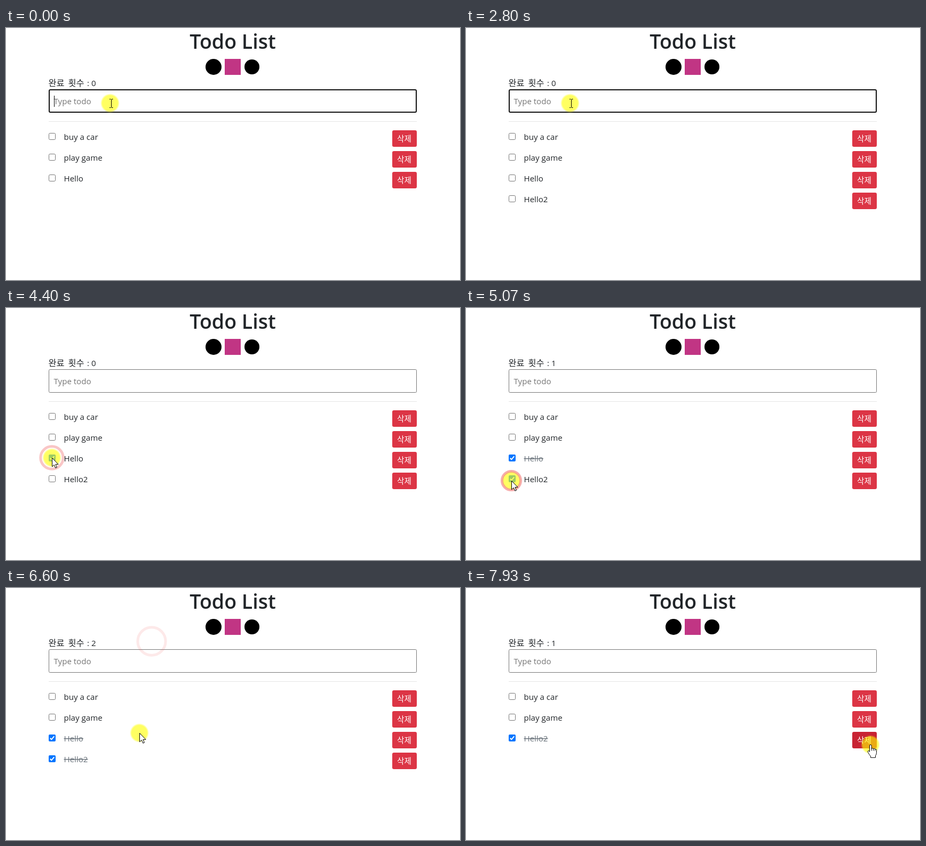
An HTML page that plays this animation: 851 px wide and 473 px high, repeating every 8 s.

```html
<!DOCTYPE html>
<html lang="ko">
<head>
<meta charset="utf-8">
<title>Todo List</title>
<style>
  html, body { margin: 0; width: 100%; height: 100%; overflow: hidden; background: #fff; }
  svg { display: block; width: 851px; height: 473px; }
  text { font: 15.1px "Open Sans", "Noto Sans", "Noto Sans CJK KR", sans-serif; fill: #212529; white-space: pre; }
  text.title { font-size: 37.5px; font-weight: 600; text-anchor: middle; }
  text.ko { font: 16.4px "Noto Sans CJK KR", sans-serif; }
  text.btn { font: 14.6px "Noto Sans CJK KR", sans-serif; fill: #fff; text-anchor: middle; }
  text.done { fill: #6c757d; text-decoration: line-through; }
  .selected text { fill: #fff; }
</style>
</head>
<body>
<svg viewBox="0 0 851 473">
  <defs>
    <radialGradient id="glow">
      <stop offset=".8" stop-color="#ff0" stop-opacity=".62"/>
      <stop offset="1" stop-color="#ff0" stop-opacity="0"/>
    </radialGradient>
    <clipPath id="selectionClip"><rect id="selectionArea" y="91" height="25"/></clipPath>
  </defs>

  <text class="title" x="425" y="39">Todo List</text>
  <circle cx="389" cy="73" r="15"/>
  <rect x="410" y="58" width="30" height="30" fill="#c13584"/>
  <circle cx="461" cy="73" r="14"/>

  <g id="counter">
    <text class="ko" x="79.5" y="109">완료</text>
    <text class="ko" x="116.5" y="109">횟수</text>
    <text id="count" x="152" y="109"></text>
  </g>
  <g id="selection" clip-path="url(#selectionClip)">
    <rect x="80" y="91" width="89" height="25" fill="#0078d7"/>
    <g class="selected" id="selectedText"></g>
  </g>

  <rect id="field" fill="#fff"/>
  <text id="fieldText" x="89.5" y="143"></text>
  <rect id="caret" y="127" width="1" height="21"/>
  <rect x="80" y="175" width="690" height="1" fill="#e5e5e5"/>
  <g id="list"></g>

  <circle id="halo" r="18" fill="url(#glow)"/>
  <circle id="ring" fill="none" stroke="#eb3c3c" stroke-width="5"/>
  <g id="pointer">
    <path id="arrow" fill="#fff" stroke="#000" d="M.5 .5V16.8L4.2 13.4 6.8 19.3 9.4 18.2 6.9 12.4H12z"/>
    <path id="ibeam" fill="none" stroke="#000" d="M-1 -7.5H1.5M3 -7.5H5.5M2.5 -7V8M-1 8.5H1.5M3 8.5H5.5"/>
    <path id="hand" fill="#fff" stroke="#000" stroke-linejoin="round"
      d="M-1.5 2q0-1.8 1.8-1.8t1.8 1.8v6q.2-1.3 1.7-1.3 1.6 0 1.7 1.7 .3-1 1.6-1 1.5 0 1.6 1.8 .3-.9 1.3-.9 1.5 0 1.5 2v5q0 3-2 5.5v3.5h-9v-2.5q-2.5-2.5-5-7.5-1-2 .3-2.7 1.5-.8 2.7 1.8zM2.1 8v3.5M5.5 8.4v3M8.7 9.2v2.5"/>
  </g>
</svg>
<script>
const LOOP = 8000, STEP = 200 / 3, BLINK = 530, RING_LIFE = 400;
const ADDED = 2730, BLUR = 4130, DELETED = 7590;

const typing = [[-200, ''], [870, 'H'], [1070, 'He'], [1130, 'Hel'], [1270, 'Hell'],
  [1670, 'Hello'], [1800, 'Hello2'], [2270, '']];

// time, x, y
const path = [[0, 195, 141], [3205, 195, 141], [3660, 93, 271], [3740, 93, 271], [3870, 91, 276],
  [4005, 91, 276], [4130, 86, 281], [4530, 86, 281], [4860, 85, 324], [5200, 85, 324],
  [5600, 196, 70], [5730, 186, 105], [5860, 186, 105], [6000, 155, 104], [6010, 155, 104],
  [6130, 98, 104], [6266, 273, 100], [6600, 250, 272], [6620, 250, 272], [7000, 744, 283],
  [7460, 744, 283], [7860, 758, 294], [LOOP, 758, 294]];

const clicks = [
  { down: 4130, up: 4260, from: [86, 281] },
  { down: 4930, up: 5070, from: [85, 324] },
  { down: 5860, up: 6266, from: [186, 105], to: [273, 100] },
  { down: 7000, up: 7066, from: [744, 283] }
];
const drag = clicks[2], removal = clicks[3];
const letterEdges = [80, 95, 109, 116, 131, 147, 152, 156, 160, 169];

const todos = [
  { name: 'buy a car' },
  { name: 'play game' },
  { name: 'Hello', checked: 4260, done: 4660, removed: DELETED },
  { name: 'Hello2', added: ADDED, checked: 5060, done: 5460 }
];

const el = {};
document.querySelectorAll('[id]').forEach(node => el[node.id] = node);
const set = (node, attrs) => Object.entries(attrs).forEach(([k, v]) => node.setAttribute(k, v));
const show = (node, on) => node.setAttribute('visibility', on ? 'visible' : 'hidden');
const during = (t, start, end) => t >= start && t < end;

function pointerAt(t) {
  const i = path.findIndex(key => key[0] > t);
  const [t0, x0, y0] = path[i - 1], [t1, x1, y1] = path[i];
  const u = (t - t0) / (t1 - t0), k = u * u * (3 - 2 * u);
  return [x0 + (x1 - x0) * k, y0 + (y1 - y0) * k];
}

function drawCounter(t, x) {
  const count = todos.filter(todo => t >= todo.done && !(t >= todo.removed)).length;
  el.count.textContent = ': ' + count;
  const selecting = during(t, drag.down, drag.up);
  show(el.selection, selecting);
  if (!selecting) return;
  const distance = edge => Math.abs(edge - x - 2);
  const start = letterEdges.reduce((a, b) => distance(b) < distance(a) ? b : a);
  set(el.selectionArea, { x: start, width: 169 - start });
  el.selectedText.innerHTML = el.counter.innerHTML.replace(/ id="\w+"/, '');
}

function drawField(t) {
  const focused = t < BLUR;
  set(el.field, focused
    ? { x: 81, y: 116, width: 688, height: 42, rx: 2, stroke: '#101010', 'stroke-width': 2 }
    : { x: 80.5, y: 115.5, width: 689, height: 43, rx: 2, stroke: '#767676', 'stroke-width': 1 });
  const [since, typed] = typing.filter(key => key[0] <= t).pop();
  el.fieldText.textContent = typed || 'Type todo';
  el.fieldText.style.fill = typed ? '#000' : '#757575';
  const width = typed ? el.fieldText.getComputedTextLength() : 0;
  set(el.caret, { x: Math.round(90 + width) });
  show(el.caret, focused && Math.floor((t - since) / BLINK) % 2 === 0);
}

function rowMarkup(todo, i, t, hover) {
  const y = 192 + 39 * i;
  const box = t >= todo.checked
    ? `<rect x="80" y="${y + 5}" width="13" height="13" rx="2" fill="#0075ff"/>
       <path d="M82.8 ${y + 11.7}l2.5 2.6 5-6" fill="none" stroke="#fff" stroke-width="2"/>`
    : `<rect x="80.5" y="${y + 5.5}" width="12" height="12" rx="2" fill="#fff" stroke="#767676"/>`;
  const pressed = todo.removed && during(t, removal.down, removal.up);
  const focus = todo.removed && t >= removal.down
    ? `<rect x="722.4" y="${y - 1.6}" width="49.2" height="34.2" rx="4.8" fill="none"
         stroke="#e15361" stroke-opacity=".5" stroke-width="3.2"/>` : '';
  const red = pressed ? '#bd2130' : hover ? '#c82333' : '#dc3545';
  return `${box}
    <text class="${t >= todo.done ? 'done' : ''}" x="108.5" y="${y + 18}">${todo.name}</text>
    ${focus}<rect x="724" y="${y}" width="46" height="31" rx="3.2" fill="${red}"/>
    <text class="btn" x="746.5" y="${y + 21}">삭제</text>`;
}

function drawRing(t) {
  const click = clicks.find(c => during(t, c.down, c.up + RING_LIFE));
  show(el.ring, click);
  if (!click) return;
  const age = Math.max(0, (t - click.up) / RING_LIFE);
  const [cx, cy] = t < click.up ? click.from : click.to || click.from;
  set(el.ring, { cx, cy, r: 17.5 + 10.2 * age, 'stroke-opacity': 0.42 * (1 - 0.86 * age) });
}

function render(t) {
  const [x, y] = pointerAt(t);
  drawCounter(t, x);
  drawField(t);

  const rows = todos.filter(todo => t >= (todo.added || 0) && !(t >= todo.removed));
  const hovered = x >= 724 && x < 770
    ? rows.findIndex((_, i) => during(y, 192 + 39 * i, 223 + 39 * i)) : -1;
  el.list.innerHTML = rows.map((todo, i) => rowMarkup(todo, i, t, i === hovered)).join('');

  drawRing(t);
  set(el.halo, { cx: x, cy: y });
  set(el.pointer, { transform: `translate(${Math.round(x)} ${Math.round(y)})` });
  const overText = during(y, 115, 159) && during(x, 80, 770) || during(y, 91, 115) && during(x, 80, 169);
  const shape = hovered >= 0 ? 'hand' : overText || during(t, drag.down, drag.up) ? 'ibeam' : 'arrow';
  ['arrow', 'ibeam', 'hand'].forEach(name => show(el[name], name === shape));
}

let lastStep = -1;
const start = performance.now();
function tick() {
  const time = (performance.now() - start) % LOOP;
  const step = Math.floor((time + 5) / STEP) % (LOOP / STEP);
  if (step !== lastStep) render(step * STEP + 5);
  lastStep = step;
  requestAnimationFrame(tick);
}
tick();
</script>
</body>
</html>
```
